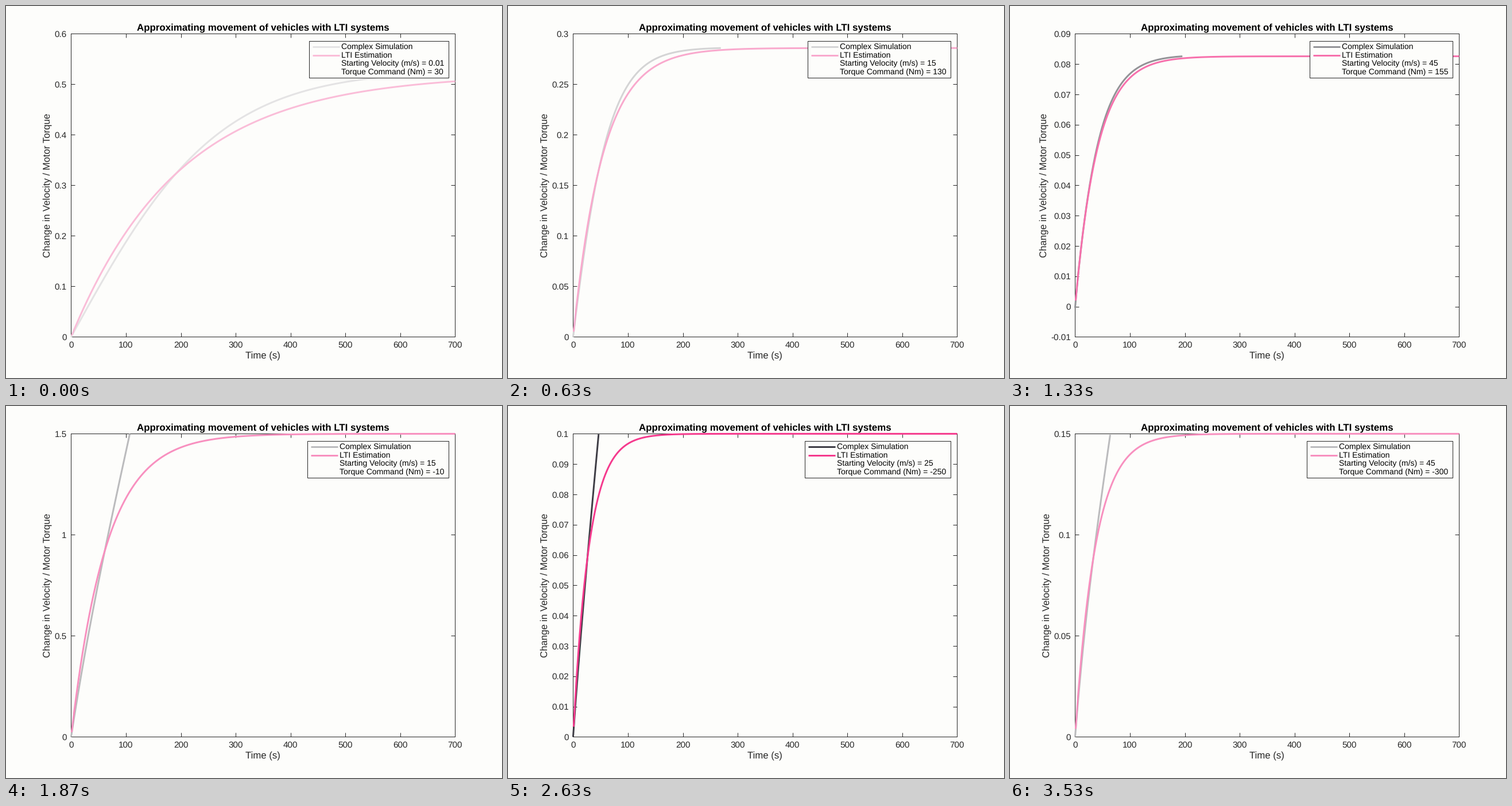
Animation, 864 px wide and 648 px high, one loop 3560 ms. Source, as a matplotlib script:

```python
import math
import numpy as np
import matplotlib
import matplotlib.pyplot as plt
from matplotlib.animation import FuncAnimation
from matplotlib.patches import Rectangle

matplotlib.rcParams.update({
    "font.family": "Liberation Sans",
    "text.hinting": "none",
    "toolbar": "None",
})

W, H = 864, 648
LOOP_MS = 3560
LEFT, RIGHT, TOP, BOTTOM = 113.4, 782.4, 48.4, 576.4
PAPER, INK = "#fdfdfb", "#262626"
GREY = (41, 40, 48)
PINK = (244, 46, 134)
TICK, LABEL, LEGEND = 15.2, 16.7, 13.95

# Sweep: every starting speed with every drive torque, then with every brake torque
DRIVE = [(v, q) for v in (0.01, 5, 15, 25, 35, 45) for q in range(30, 181, 25)]
BRAKE_TORQUES = [-5, -10, *range(-25, -251, -25), -300]
BRAKE = [(v, q) for v in (5, 15, 25, 35, 45) for q in BRAKE_TORQUES]
RUNS = DRIVE + BRAKE

# Vehicle model: dv/dt = gain * torque - ROLL - DRAG * v^2
DRAG = 2.33e-4
SETTLED = 0.002
T = np.linspace(0, 700, 2801)


def simulate(v0, torque):
    """Speed change per torque; NaN once the vehicle has settled or stopped."""
    if torque > 0:
        vf = math.sqrt(24.77 * torque - 490)
        th = np.tanh(T * DRAG * vf)
        v = vf * (v0 + vf * th) / (vf + v0 * th)
        lag = 2.5e-5 * (490 + v0 ** 2) / torque
        change = (v - v0) / torque - lag * np.exp(-T / 1.5)
        return np.where(DRAG * abs(vf ** 2 - v ** 2) > SETTLED, change, np.nan)
    decel = 0.109 - 0.00153 * torque
    w = math.sqrt(decel / DRAG)
    angle = math.atan(v0 / w) - T * math.sqrt(decel * DRAG)
    v = np.where(angle >= 0, w * np.tan(np.maximum(angle, 0)), np.nan)
    return (v - v0) / torque


def estimate(sim, v0, torque):
    """First-order step response with the same end value and 63 % time."""
    gain = sim[~np.isnan(sim)][-1] if torque > 0 else -v0 / torque
    reached = np.where(np.isnan(sim), 1, sim / gain)
    tau = T[np.argmax(reached >= 1 - math.exp(-1))] + 1
    return gain * (1 - np.exp(-T / tau))


def nice_ticks(lo, hi):
    """Tightest 1-2-5 axis with at most ten intervals."""
    span = hi - lo
    if -lo < 0.002 * span:
        lo = 0
    if hi < 0.002 * span:
        hi = 0
    power = math.floor(math.log10(span))
    best = None
    for step in (m * 10.0 ** p for p in (power - 1, power) for m in (1, 2, 5)):
        a = math.floor(lo / step + 1e-6)
        b = math.ceil(hi / step - 1e-6)
        if b - a > 10:
            continue
        size = (b - a) * step
        if best is None or size < best[0] * (1 - 1e-6):
            best = (size, step * np.arange(a, b + 1))
    return best[1]


def strength(i):
    keys = [0, 19, 40, 56, 79, 94, 106]
    levels = [0.12, 0.20, 0.50, 0.31, 0.90, 0.50, 0.31]
    return math.exp(np.interp(i, keys, np.log(levels)))


def tint(color, amount):
    """Solid colour faded towards the paper."""
    return [(253 + (c - 253) * amount) / 255 for c in color]


fig = plt.figure(figsize=(W / 72, H / 72), dpi=72, facecolor=PAPER)
ax = fig.add_axes([LEFT / W, 1 - BOTTOM / H, (RIGHT - LEFT) / W, (BOTTOM - TOP) / H],
                  facecolor=PAPER)
ax.set_xlim(0, 700)
ax.set_xticks(range(0, 701, 100))
ax.tick_params(direction="in", length=6.7, width=1, color=INK, labelcolor=INK,
               labelsize=TICK, top=True, right=True)
ax.tick_params(axis="x", pad=7.8)
ax.tick_params(axis="y", pad=7.6)
for spine in ax.spines.values():
    spine.set(color=INK, linewidth=1)
curve = dict(lw=3, solid_capstyle="butt", clip_on=False)
sim_line, = ax.plot([], [], zorder=3, **curve)
lti_line, = ax.plot([], [], zorder=3.1, **curve)

# Overlay in pixel units, y downwards
top = fig.add_axes([0, 0, 1, 1], zorder=5)
top.set(xlim=(0, W), ylim=(H, 0))
top.axis("off")


def label(x, y, s, size, **kw):
    return top.text(x, y, s, fontsize=size, va="baseline", **kw)


label(447.5, 42.3, "Approximating movement of vehicles with LTI systems",
      16.85, ha="center", weight="bold", color="black")
label(447, 613, "Time (s)", LABEL, ha="center", color=INK)
ylabel = label(77, 312.5, "Change in Velocity / Motor Torque", LABEL, color=INK,
               ha="center", rotation=90, rotation_mode="anchor")
exponent = label(112.5, 44, r"$\times\mathregular{10^{-3}}$", LEGEND, color=INK)
probe = label(0, 0, "", TICK, alpha=0)

box = Rectangle((0, 60.5), 1, 64, facecolor=PAPER, edgecolor=INK, lw=1)
top.add_patch(box)
rows = [label(0, 75.2 + 14.65 * k, "", LEGEND, color="black") for k in range(4)]
sim_key, = top.plot([], [], lw=3, solid_capstyle="butt")
lti_key, = top.plot([], [], lw=3, solid_capstyle="butt")


def width(text):
    return text.get_window_extent().width * 72 / fig.dpi


def draw_axis(ticks):
    small = max(abs(ticks)) < 0.0101
    scale = 1000 if small else 1
    names = [f"{round(v * scale, 6) + 0.0:g}" for v in ticks]
    ax.set_yticks(ticks, names)
    ax.set_ylim(ticks[0], ticks[-1])
    exponent.set_visible(small)
    widest = 0
    for name in names:
        probe.set_text(name)
        widest = max(widest, width(probe))
    probe.set_text("")
    ylabel.set_x(105.5 - widest - 7.6)


def draw_legend(v0, torque):
    texts = ("Complex Simulation", "LTI Estimation",
             f"Starting Velocity (m/s) = {v0:g}",
             f"Torque Command (Nm) = {torque}")
    for row, s in zip(rows, texts):
        row.set_text(s)
    left = round(770 - 63.7 - max(map(width, rows))) + 0.5
    box.set_x(left)
    box.set_width(770.5 - left)
    for row in rows:
        row.set_x(left + 56.7)
    for key, y in ((sim_key, 70.5), (lti_key, 85.5)):
        key.set_data([left + 6.5, left + 53], [y, y])


def update(i):
    v0, torque = RUNS[i]
    sim = simulate(v0, torque)
    lti = estimate(sim, v0, torque)
    sim_line.set_data(T, sim)
    started = T >= 1
    lti_line.set_data(T[started], lti[started])
    data = np.concatenate([sim, lti])
    draw_axis(nice_ticks(np.nanmin(data), np.nanmax(data)))
    draw_legend(v0, torque)
    a = strength(i)
    for line in (sim_line, sim_key):
        line.set_color(tint(GREY, a))
    for line in (lti_line, lti_key):
        line.set_color(tint(PINK, a ** 0.55))
    return ()


anim = FuncAnimation(fig, update, frames=len(RUNS), init_func=lambda: (),
                     interval=LOOP_MS / len(RUNS), repeat=True, repeat_delay=0)
plt.show()
```
